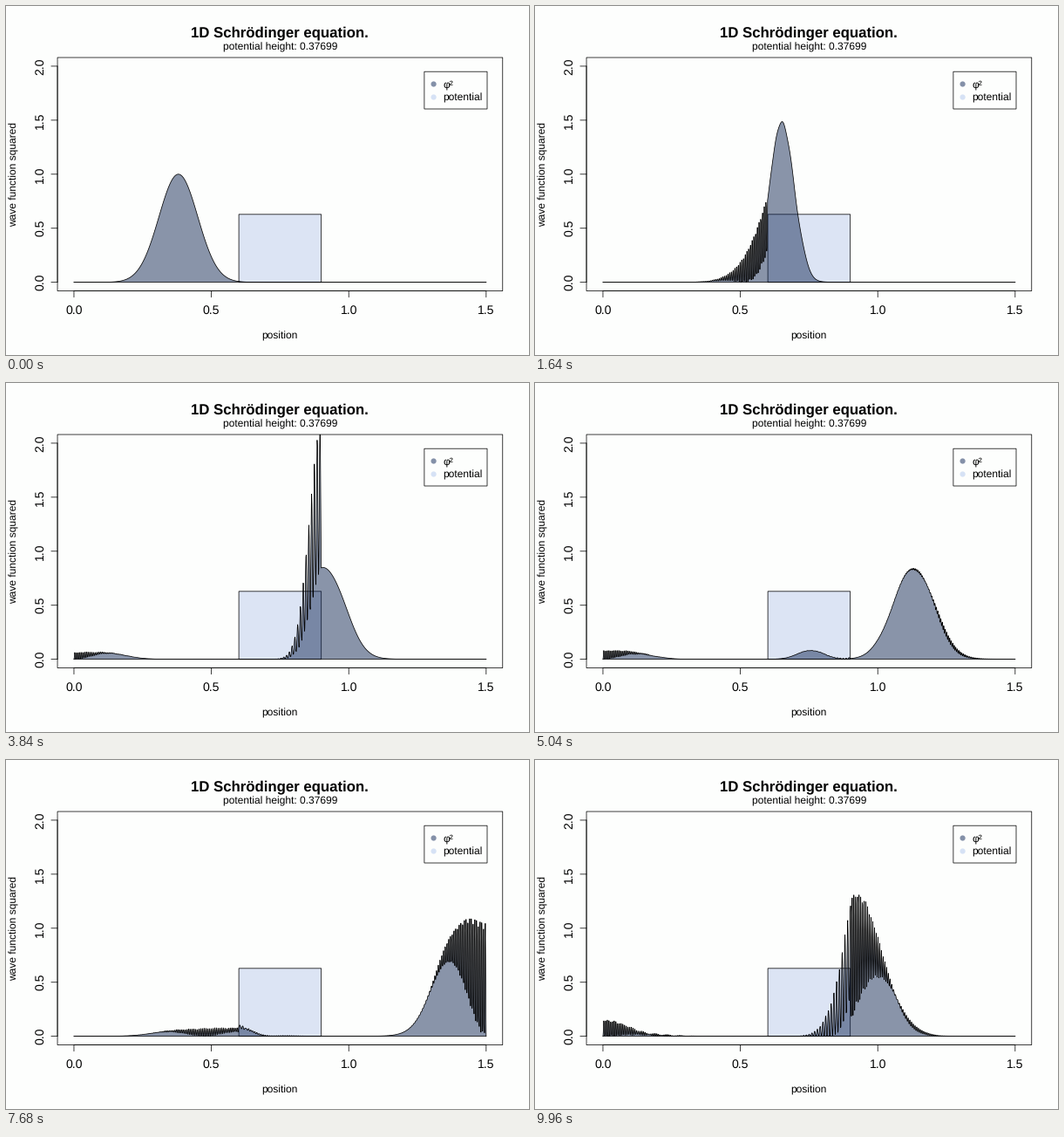
A matplotlib script for the animation above (10 s loop, 600 by 400 pixels).

```python
import numpy as np
import matplotlib.pyplot as plt
from matplotlib.animation import FuncAnimation
from matplotlib.patches import Circle, Polygon, Rectangle

plt.rcParams["font.family"] = "Liberation Sans"
plt.rcParams["text.hinting"] = "none"
plt.rcParams["path.simplify"] = False
plt.rcParams["path.snap"] = False

W, H, DPI = 600, 400, 100
FRAMES, INTERVAL = 250, 40
PT = 72 / DPI                      # points per pixel
THIN = 0.75 * PT

PAPER = "#fdfefd"
INK = "black"
WAVE = "#162b57"
BARRIER = "#dce4f4"

# Plot region: margins in text lines of 14.4 px, ranges widened by 4 %
X0, X1 = 59.04, 569.76
Y0, Y1 = 59.04, 326.56
X_UNIT = (X1 - X0) / (1.5 * 1.08)
Y_UNIT = (Y1 - Y0) / (2 * 1.08)

# Lattice model: sites, packet and barrier in units of the grid step
SITES = 1500
STEP = 1.5 / SITES
START, WIDTH, K0 = 0.38, 0.1, 0.5
LEFT, RIGHT = 0.6, 0.9
POTENTIAL = 0.6 * K0 ** 2 / 2
TIME_STEP = 15.3                   # lattice time per frame
SHOWN_HEIGHT = 0.12 * np.pi


def px(x):
    return X0 + (x + 0.06) * X_UNIT


def py(y):
    return Y1 - (y + 0.08) * Y_UNIT


def solve():
    """Squared wave function for every frame, hard walls at both ends."""
    x = STEP * np.arange(1, SITES)
    v = np.where((x > LEFT - STEP / 2) & (x < RIGHT + STEP / 2), POTENTIAL, 0)
    n = len(x)
    ham = np.diag(1 + v) - 0.5 * (np.eye(n, k=1) + np.eye(n, k=-1))
    energy, modes = np.linalg.eigh(ham)

    packet = np.exp(-(x - START) ** 2 / (2 * WIDTH ** 2) + 1j * K0 * x / STEP)
    coef = modes.T @ packet.real + 1j * (modes.T @ packet.imag)
    times = TIME_STEP * np.arange(FRAMES)
    spectrum = coef[:, None] * np.exp(-1j * energy[:, None] * times)
    density = (modes @ spectrum.real) ** 2 + (modes @ spectrum.imag) ** 2
    return np.pad(x, 1, constant_values=(0, 1.5)), np.pad(density.T, ((0, 0), (1, 1)))


xs, density = solve()

fig = plt.figure(figsize=(W / DPI, H / DPI), dpi=DPI, facecolor=PAPER)
ax = fig.add_axes([0, 0, 1, 1])
ax.set_xlim(0, W)
ax.set_ylim(H, 0)
ax.axis("off")


def label(x, y, text, size, ha="center", **kw):
    ax.text(x, y, text, fontsize=size * PT, color=INK, ha=ha, va="baseline",
            rotation_mode="anchor", **kw)


def line(x, y, z=5):
    ax.plot(x, y, color=INK, lw=THIN, solid_capstyle="round", zorder=z)


def frame_box(x0, y0, x1, y1, fill="none", z=5):
    box = Rectangle((x0, y0), x1 - x0, y1 - y0, fc=fill, ec=INK, lw=THIN,
                    zorder=z, snap=False)
    ax.add_patch(box)
    return box


# Plot frame and axes
plot_box = frame_box(X0, Y0, X1, Y1)
line([px(0), px(1.5)], [Y1, Y1])
line([X0, X0], [py(0), py(2)])
for value in (0, 0.5, 1, 1.5):
    line([px(value)] * 2, [Y1, Y1 + 7.2])
    label(px(value), 353, f"{value:.1f}", 14)
for value in (0, 0.5, 1, 1.5, 2):
    line([X0 - 7.2, X0], [py(value)] * 2)
    label(43, py(value), f"{value:.1f}", 14, rotation=90)

label(314, 35.7, "1D Schrödinger equation.", 16.8, weight="bold")
label(314.4, 51, f"potential height: {SHOWN_HEIGHT:.5f}", 12)
label(314.2, 382, "position", 12)
label(13, 193, "wave function squared", 12, rotation=90)

# Barrier and wave
frame_box(px(LEFT), py(SHOWN_HEIGHT / 0.6), px(RIGHT), py(0), BARRIER, z=1)
fill = Polygon([[0, 0]], fc=WAVE, ec="none", alpha=0.5, zorder=2, snap=False)
ax.add_patch(fill)
curve, = ax.plot([], [], color=INK, lw=THIN, solid_joinstyle="round", zorder=3)
line([px(0), px(1.5)], [py(0)] * 2, z=3)
for artist in (fill, curve):
    artist.set_clip_path(plot_box)

# Legend
frame_box(479.9, 75.2, 552, 118, PAPER)
for y, color, text in ((89.5, "#8490a8", "φ²"), (104.5, "#d6e2f5", "potential")):
    ax.add_patch(Circle((490.6, y), 3.1, fc=color, ec="none", zorder=6))
    label(501, y + 4.5, text, 12, ha="left", zorder=6)


def update(i):
    points = np.column_stack([px(xs), py(density[i])])
    fill.set_xy(points)
    curve.set_data(points[:, 0], points[:, 1])
    return fill, curve


anim = FuncAnimation(fig, update, frames=FRAMES, interval=INTERVAL,
                     repeat=True, repeat_delay=0)
plt.show()
```
